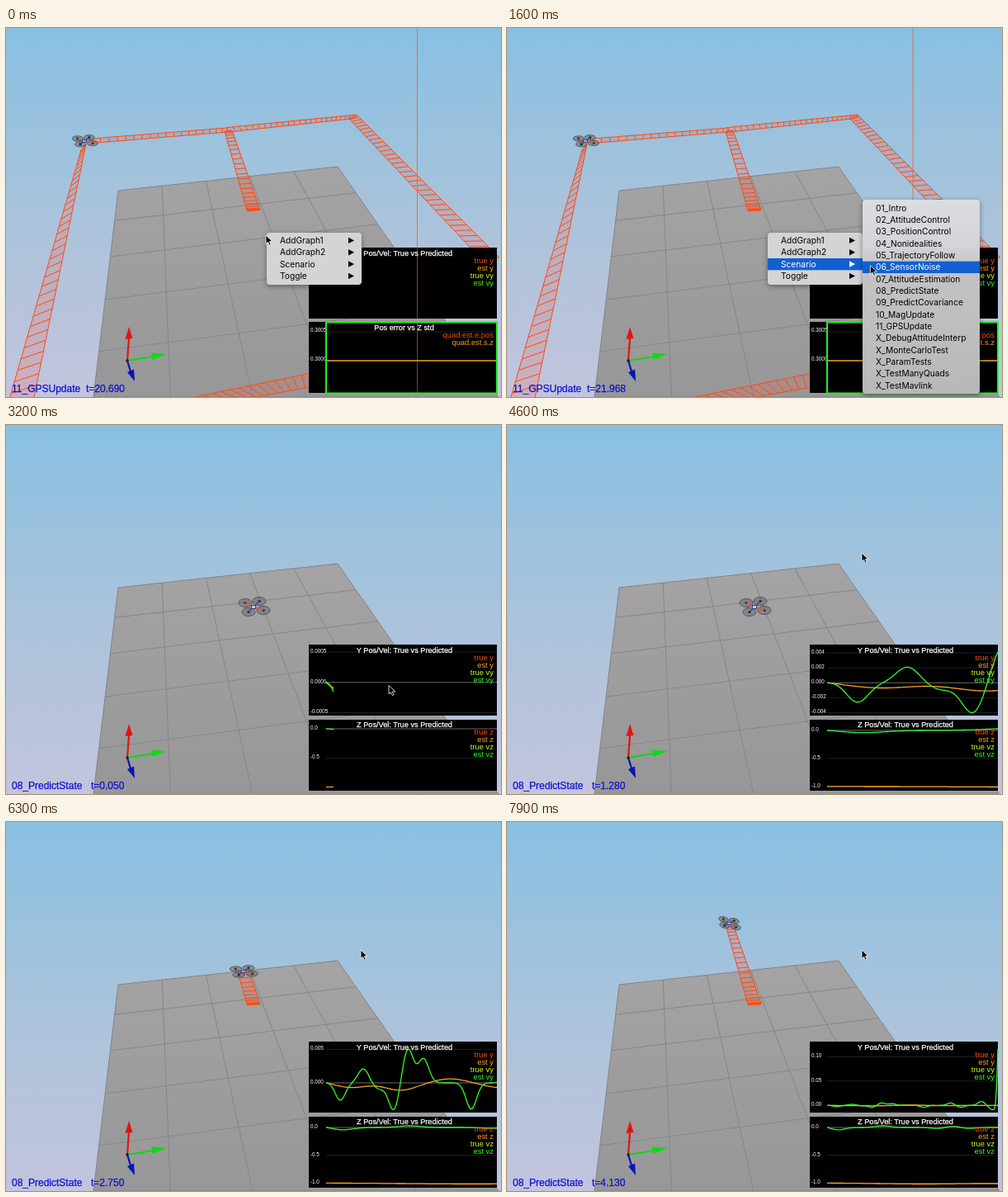
Animation of 600 by 447 pixels, one loop 8 s. Source, as an HTML page:

```html
<!DOCTYPE html>
<html lang="en">
<head>
<meta charset="utf-8">
<title>Quadrotor simulator</title>
<style>
  html, body { margin: 0; width: 100%; height: 100%; overflow: hidden; }
  svg { display: block; width: 100vw; height: 100vh; }
  text { font-family: "Liberation Sans", Arial, sans-serif; white-space: pre; }
  .menu text { font: 10.2px Inter, sans-serif; }
  .panel { filter: drop-shadow(0 2px 3px #0006); }
  .title { font-size: 9.2px; fill: #fff; stroke: #fff; stroke-width: .25; text-anchor: middle; }
  .legend { font-size: 9.4px; text-anchor: end; }
  .tick { font-size: 6.3px; fill: #fff; }
  .status { font-size: 12px; fill: #1010d0; stroke: #1010d0; stroke-width: .25; }
</style>
</head>
<body>
<svg viewBox="0 0 600 447" preserveAspectRatio="none">
  <defs>
    <linearGradient id="sky" x2="0" y2="1">
      <stop stop-color="#88c0e2"/><stop offset=".5" stop-color="#a9c3db"/><stop offset="1" stop-color="#c3c4dd"/>
    </linearGradient>
    <linearGradient id="ground" x2="0" y2="1">
      <stop stop-color="#a5a3a4"/><stop offset="1" stop-color="#979798"/>
    </linearGradient>
    <linearGradient id="submenu" x2="0" y2="1">
      <stop stop-color="#dadde2"/><stop offset=".24" stop-color="#d2d4d7"/>
      <stop offset=".35" stop-color="#c3c3c4"/><stop offset="1" stop-color="#b8b8b8"/>
    </linearGradient>
  </defs>
  <rect width="600" height="447" fill="url(#sky)"/>
  <path d="M136 197L402 168L597 447H106Z" fill="url(#ground)" stroke="#838385"/>
  <path id="grid" fill="none" stroke="#868688"/>
  <g id="trail" fill="#e8604833" stroke="#ff4a14"></g>
  <g id="drone"></g>
  <g id="axes" stroke-width="2.2"></g>
  <text id="label" class="status" x="7" y="441"></text>
  <text id="clock" class="status" y="441"></text>
  <g id="panels"></g>
  <g id="menus" class="menu"></g>
  <path id="cursor" d="M0 0V10.5L2.5 8.3L4.3 12.2L6.1 11.4L4.4 7.6H7.8Z" fill="#000" stroke="#fff" stroke-width=".8"/>
</svg>
<script>
const LOOP = 8000, STEP = 100, MENU_OPEN = 1300, MENU_CLOSE = 3000, SWITCH = 3200;
const RED = '#ff4a0c', ORANGE = '#ffa01e', LIME = '#c8ff28', GREEN = '#30fb28';
const el = id => document.getElementById(id);
const lerp = (a, b, u) => a + (b - a) * u;
const mix = (p, q, u) => p.map((v, i) => lerp(v, q[i], u));
const clamp = u => Math.max(0, Math.min(1, u));
const smooth = u => u * u * (3 - 2 * u);
const range = n => [...Array(n).keys()];
const line = (a, b) => `M${a[0].toFixed(1)} ${a[1].toFixed(1)}L${b[0].toFixed(1)} ${b[1].toFixed(1)}`;

// Pointer path: into the menu, along to the submenu, down to the choice, then away
function pointerAt(ms) {
  const legs = [[0, 315, 251], [900, 338, 285], [1700, 455, 288], [2400, 464, 316], [3700, 464, 315], [4400, 430, 155]];
  const i = legs.findIndex(k => k[0] > ms);
  if (i < 0) return legs.at(-1).slice(1);
  const [a, b] = [legs[i - 1], legs[i]];
  return mix(a, b, (ms - a[0]) / (b[0] - a[0])).slice(1);
}

// Simulated seconds; the second run is a little faster than the first
const oldClock = ms => 20.69 + ms * .000806 - Math.max(0, ms - 900) * .0000167;
const newClock = ms => .05 + (ms - SWITCH) * .000868 + .014 * Math.sin(Math.PI * clamp((ms - SWITCH) / 4700));

// Noise-like signals as sums of bell-shaped bumps [time, height], settling from zero
const bumps = (width, list) => t => (1 - Math.exp(-10 * t)) *
  list.reduce((sum, [at, height]) => sum + height * Math.exp(-(((t - at) / width) ** 2)), 0);
const wobble = bumps(.12, [[.22, -2.9], [.6, 2.1], [.85, -.9], [1.09, -4.1], [1.32, 5.1], [1.57, 3.6],
  [2.34, -3.9], [2.99, 5], [3.23, -4], [3.73, 8], [4, -9]]);
const velY = t => wobble(t) + 120 * clamp((t - 4.05) / .08) ** 2;
const posY = bumps(.35, [[.4, -.7], [1.2, -1.1], [2, .6], [2.8, -.7]]);
const velZ = bumps(.25, [[.25, -.045], [1.35, .03], [2.7, -.02], [3.05, .025], [3.4, -.02]]);
const posZ = t => -.999 - .012 * Math.sin(Math.min(t, 1.5)) + .004 * Math.sin(2 * t);

// Two rails from pair (a0, b0) to (a1, b1), with rungs at the given fractions
function ladder(a0, b0, a1, b1, rungs) {
  const d = line(a0, a1) + line(b0, b1) + rungs.map(u => line(mix(a0, a1, u), mix(b0, b1, u))).join('');
  return `<path stroke="none" d="M${a0}L${a1}L${b1}L${b0}Z"/><path fill="none" d="${d}"/>`;
}
const spaced = (n, power = 1) => range(n + 1).map(i => (i / n) ** power);

const progress = t => smooth(clamp((t - 1.55) / 2.8));
function firstLeg(t) {
  const p = progress(t);
  if (p < .02) return '';
  const a = [292, 221], b = [308, 220];
  const rungs = range(24).map(i => progress(1.55 + i * .12) / p).filter(u => u <= 1);
  return ladder(a, b, mix(a, [265, 125], p), mix(b, [274, 124], p), rungs) +
    `<path stroke-width="2.5" d="${line(a, b)}"/>`;
}
const fullTrail = firstLeg(4.35) +
  ladder([268, 121], [268, 126], [104, 134], [104, 139.5], spaced(18, 1.15)) +
  ladder([425, 105], [423, 109.5], [267, 120.5], [270, 126], spaced(24, 1.2)) +
  ladder([426, 106], [415, 109], [598, 278], [574, 278], spaced(33, 1.3)) +
  ladder([97, 141], [91, 148], [34, 447], [2, 457], spaced(34, 1.6)) +
  ladder([380, 416], [380, 433], [228, 447], [260, 455], spaced(14));

function drone(x, y, sx, sy, turn) {
  const hubs = [[-10, -5], [7, -7], [-6, 6], [12, 4]].map(([u, v]) => [u * sx, v * sy]);
  const arms = hubs.map((h, i) => `<path d="M0 0L${h}" stroke="${i % 3 ? '#3a48a0' : '#e0562c'}" stroke-width="1.4"/>`);
  const props = hubs.map(([u, v]) => `<ellipse cx="${u}" cy="${v}" rx="${8 * sx}" ry="${5 * sy}" fill="#6c717899" stroke="#4c5054" stroke-width=".9"/>
    <circle cx="${u}" cy="${v}" r="1.6" fill="#222"/>`);
  return `<g transform="translate(${x} ${y}) rotate(${turn})">${props.join('')}${arms.join('')}
    <rect x="-2.5" y="${-2 * sy}" width="5" height="${4 * sy}" fill="#c8ccd8" stroke="#303c90"/></g>`;
}

const text = (cls, x, y, s, fill) => `<text class="${cls}" x="${x}" y="${y}"${fill ? ` fill="${fill}"` : ''}>${s}</text>`;
const panel = y => `<rect x="367" y="${y}" width="228" height="86" fill="#000"/>`;
const legend = (y, names) => names.map((s, i) =>
  text('legend', 591, y + 9 * i, s, [RED, ORANGE, LIME, GREEN][i])).join('');
const rule = (y, color, w = 1) => `<path d="M388 ${y}H595" stroke="${color}" stroke-width="${w}"/>`;

// Autoscaled chart; unit converts data to the labelled quantity
function chart(top, bottom, curves, t, floor, ceil, unit) {
  const n = 150, span = Math.max(1.15, t);
  const data = curves.map(([f, color]) => [range(n + 1).map(i => f(t * i / n)), color]);
  const all = data.flatMap(d => d[0]);
  const lo = Math.min(floor, ...all), hi = Math.max(ceil, ...all), extent = (hi - lo) * unit;
  const toY = v => lerp(bottom, top, (v - lo) / (hi - lo));
  const power = 10 ** Math.floor(Math.log10(extent / 4.25));
  const step = [1, 2, 5, 10].map(m => m * power).find(s => extent / s <= 4.25);
  const digits = Math.max(0, -Math.floor(Math.log10(step) + 1e-6));
  let out = '';
  for (let k = Math.ceil(lo * unit / step - 1e-9); k * step <= hi * unit + 1e-9; k++) {
    const y = toY(k * step / unit);
    out += rule(y.toFixed(1), k ? '#202020' : '#686868') + text('tick', 369, y + .8, (k * step).toFixed(digits));
  }
  for (const [values, color] of data) {
    const pts = values.map((v, i) => `${(388 + 207 * t / span * i / n).toFixed(1)},${toY(v).toFixed(1)}`);
    out += `<polyline points="${pts.join(' ')}" fill="none" stroke="${color}" stroke-width="1.3"/>`;
  }
  return out;
}

const axisNames = a => [`true ${a}`, `est ${a}`, `true v${a}`, `est v${a}`];
const titleY = text('title', 483, 275.5, 'Y Pos/Vel: True vs Predicted');

const livePanels = t => panel(266) +
  chart(275, 348.5, [[posY, ORANGE], [velY, GREEN]], t, -.5, .5, .001) + titleY + legend(284.5, axisNames('y')) +
  panel(357) + chart(368, 438.5, [[posZ, ORANGE], [velZ, GREEN]], t, -.999, 0, 1) +
  text('title', 483, 366, 'Z Pos/Vel: True vs Predicted') + legend(375, axisNames('z'));

const oldPanels = x => `<path d="M${x} 0V266" stroke="#e8703c"/>` + panel(266) + panel(356) +
  `<path d="M${x} 266V352M${x} 357V442" stroke="#8a3c12"/>` +
  titleY + legend(284.5, axisNames('y')) +
  rule(368, '#202020') + rule(403, '#f0a820', 1.5) + text('tick', 369, 368.3, '0.3005') + text('tick', 369, 403.3, '0.3000') +
  '<rect x="388" y="356.5" width="207" height="86" fill="none" stroke="#20f020" stroke-width="2"/>' +
  text('title', 482.5, 366, 'Pos error vs Z std') + legend(375, ['quad.est.e.pos', 'quad.est.s.z']);

const mainItems = ['AddGraph1', 'AddGraph2', 'Scenario', 'Toggle'];
const subItems = ['01_Intro', '02_AttitudeControl', '03_PositionControl', '04_Nonidealities', '05_TrajectoryFollow',
  '06_SensorNoise', '07_AttitudeEstimation', '08_PredictState', '09_PredictCovariance', '10_MagUpdate', '11_GPSUpdate',
  'X_DebugAttitudeInterp', 'X_MonteCarloTest', 'X_ParamTests', 'X_TestManyQuads', 'X_TestMavlink'];
const ROW = 14.33, MAIN_TOP = 250.3, SUB_TOP = 211;

function menu(x, y, w, h, first, items, active, fill, arrows) {
  const rows = items.map((s, i) => {
    const top = first + i * ROW, ink = i === active ? '#fff' : '#000';
    return (i === active ? `<rect x="${x}" y="${top}" width="${w}" height="${ROW}" fill="#1260d0"/>` : '') +
      text('', x + 16, top + 10.8, s, ink) +
      (arrows ? `<path d="M${x + 99} ${top + 3.4}v7.4l7-3.7z" fill="${ink}"/>` : '');
  });
  return `<rect class="panel" x="${x}" y="${y}" width="${w}" height="${h}" rx="4" fill="${fill}"/>` + rows.join('');
}

function menus(ms, [x, y]) {
  if (ms >= MENU_CLOSE) return '';
  const sub = ms >= MENU_OPEN;
  const active = sub ? 2 : x > 316 ? Math.floor((y - MAIN_TOP) / ROW) : -1;
  const subActive = x > 431 ? Math.floor((y - SUB_TOP) / ROW) : -1;
  return menu(316, 248, 115, 63, MAIN_TOP, mainItems, active, '#d4d4d5', true) +
    (sub ? menu(431, 208, 142, 235, SUB_TOP, subItems, subActive, 'url(#submenu)', false) : '');
}

// Ground grid: evenly split columns, and rows whose depth grows geometrically
const columns = range(4).map(i => line(mix([136, 197], [402, 168], (i + 1) / 5), mix([100, 447], [597, 447], (i + 1) / 5)));
const rows = range(4).map(i => {
  const depth = (1.2 ** (i + 1) - 1) / .2, left = 36.3 * depth, right = 31.7 * depth;
  return line([136 - .12 * left, 197 + left], [402 + .7 * right, 168 + right]);
});
el('grid').setAttribute('d', columns.concat(rows).join(''));

el('axes').innerHTML = [
  ['#e01410', '149 376', '144.5 377L149 362L153.5 376'],
  ['#10d818', '178 398', '176 393.5L194.5 395L177.5 402'],
  ['#0a14b4', '151 416', '147 417L156 428L155 413.5']
].map(([c, end, head]) => `<path d="M147 403L${end}" stroke="${c}"/><path d="M${head}Z" fill="${c}"/>`).join('') +
  '<circle cx="147" cy="403" r="1.8" fill="#222"/>';

function draw(ms) {
  const old = ms < SWITCH, t = old ? oldClock(ms) : newClock(ms), pointer = pointerAt(ms);
  el('label').textContent = old ? '11_GPSUpdate' : '08_PredictState';
  el('clock').textContent = 't=' + (old ? t.toFixed(3) : t.toFixed(2) + '0');
  el('clock').setAttribute('x', old ? 97 : 103);
  el('trail').innerHTML = old ? fullTrail : firstLeg(t);
  const p = progress(t), [x, y] = mix([300, 220.5], [268.5, 121], p);
  el('drone').innerHTML = old ? drone(95, 137, .82, .62, 0)
    : drone(x, y, 1 - .25 * p, lerp(1, .62, clamp(p / .4)), 14 * clamp((p - .85) / .13));
  el('panels').innerHTML = old ? oldPanels((498.5 - ms * .004).toFixed(1)) : livePanels(t);
  el('menus').innerHTML = menus(ms, pointer);
  el('cursor').setAttribute('transform', `translate(${pointer})`);
}

let shown = -1;
function tick() {
  const ms = Math.floor(performance.now() % LOOP / STEP) * STEP;
  if (ms !== shown) draw(shown = ms);
  requestAnimationFrame(tick);
}
tick();
</script>
</body>
</html>
```
